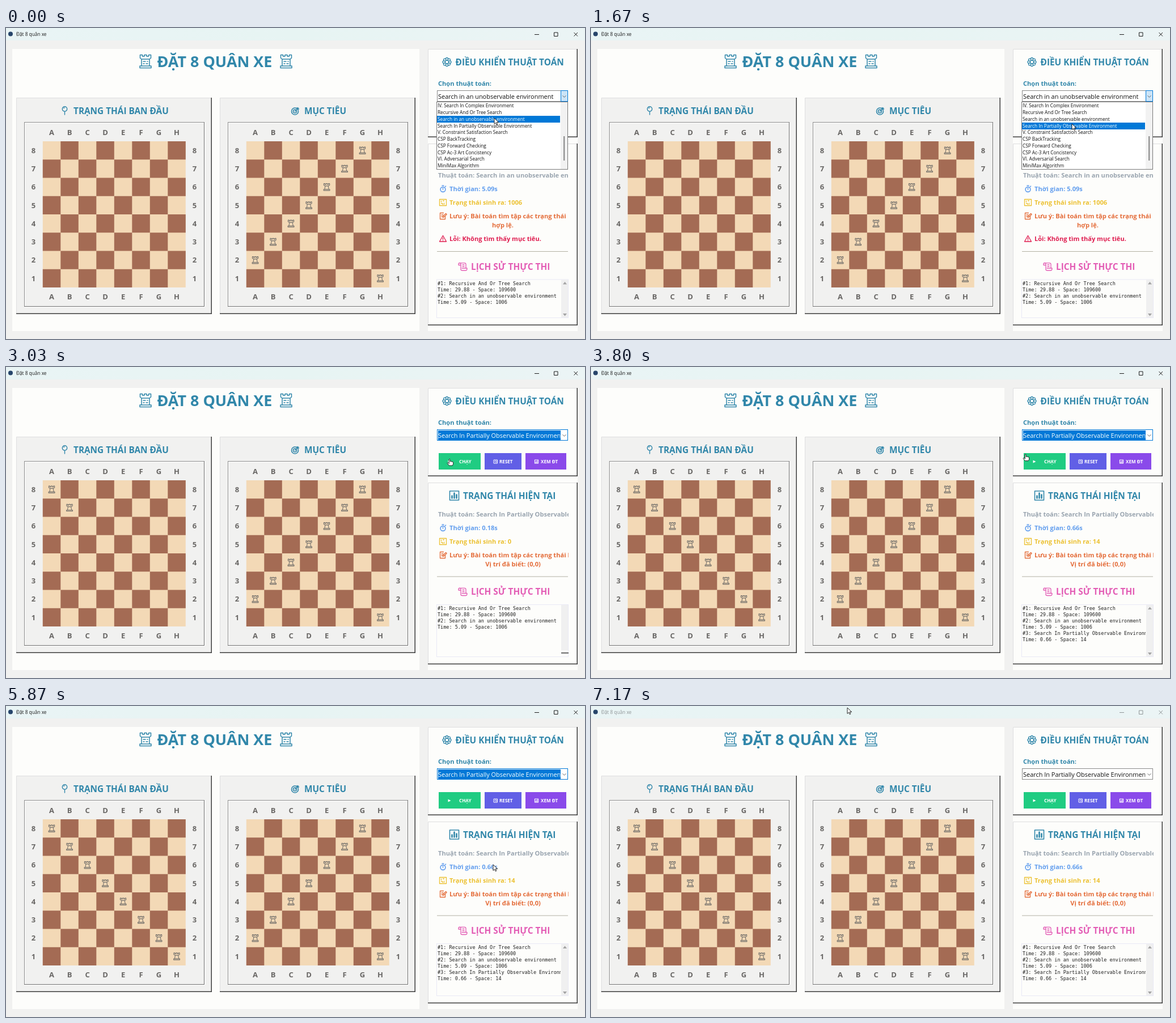
Recreate the animation shown at these times as an HTML page. Size 1021x549 px, loop 7.21 s.

```html
<!DOCTYPE html>
<html lang="vi">
<head>
<meta charset="utf-8">
<title>Đặt 8 quân xe</title>
<style>
  html, body { margin: 0; width: 100%; height: 100%; overflow: hidden; background: #f1f1f0; }
  svg { display: block; width: 1021px; height: 549px; }
  text { font-family: "Open Sans", "Noto Sans", sans-serif; white-space: pre; }
  .b { font-weight: 700; }
  .m { font-family: "DejaVu Sans Mono", monospace; }
  .i { fill: none; stroke: currentColor; stroke-width: 1.3; stroke-linejoin: round; stroke-linecap: round; }
</style>
</head>
<body>
<svg id="stage" viewBox="0 0 1021 549"></svg>
<script>
const LOOP = 7210, RUN = 2850, STEP = 80, CLOSE = 1980, BLUR = 6850;
const TEAL = '#3187aa', BLUE = '#0078d7', PAPER = '#fdfdfb', FACE = '#f1f1f0';
const BLUES = '#629eee', GOLD = '#ecc132', ORANGE = '#e46c39', RED = '#df1c4f', PINK = '#e35db5';
const BOARD_X = 64.8, CELL_W = 31.5, CELL_H = 32.25, GAP = 359;

const rect = (x, y, w, h, fill, extra = '') =>
  `<rect x="${x}" y="${y}" width="${w}" height="${h}" fill="${fill}" ${extra}/>`;
const box = (x, y, w, h, stroke, fill = 'none') =>
  rect(x + .5, y + .5, w - 1, h - 1, fill, `stroke="${stroke}"`);
const text = (x, y, size, fill, str, cls = '', extra = '') =>
  `<text x="${x}" y="${y}" font-size="${size}" fill="${fill}" class="${cls}" ${extra}>${str}</text>`;
const bold = (x, y, size, fill, str, extra) => text(x, y, size, fill, str, 'b', extra);
const middle = 'text-anchor="middle"';
const group = (id, body, extra = '') => `<g id="${id}" ${extra}>${body}</g>`;
const icon = (x, y, color, d, width = 1.3) =>
  `<path class="i" style="color:${color};stroke-width:${width}" transform="translate(${x} ${y})" d="${d}"/>`;
const range = n => [...Array(n).keys()];
const circle = (r, x = 0, y = 0) => `M${x - r} ${y}a${r} ${r} 0 1 0 ${2 * r} 0a${r} ${r} 0 1 0 ${-2 * r} 0`;

const ROOK = 'M-5.400 6v-2h1.800l.9-6-2.400-1.400v-2.800h2v1.500h1.800v-1.500h2.600v1.500h1.800v-1.500h2v2.800l-2.400 1.400 .9 6h1.800v2zM-2.700-2h5.400M-3.600 4h7.200';
const TOWER = 'M-10 11.500v-3.500h3v-12l-2.500-2v-5.500h4v2.500h3.500v-2.500h4v2.500h3.500v-2.500h4v5.500l-2.500 2v12h3v3.500zM-7-4h14M-7 8h14M-4 0h4M3 0h1M-4 4h2M1 4h3';
const CHEVRON = 'M-2.700-1.400l2.700 2.700 2.700-2.700';
const SCROLL = 'M-3 5v-9c0-3-4-3-4 0v1.500h4M-5-6.200h8.500c2 0 2.500 1 2.500 2.500v6.500M-1 3h9v1c0 2-1 3-2.500 3h-6c-2 0-2.500-1-2.500-2M0-3h3M0 0h3';

function raised(x, y, w, h, fill) {
  return rect(x, y, w, h, fill) +
    `<path d="M${x + .5} ${y + h}V${y + .5}H${x + w}" fill="none" stroke="#dededf"/>` +
    `<path d="M${x} ${y + h - .75}H${x + w - .75}V${y}" fill="none" stroke="#3c3c3c" stroke-width="1.5"/>`;
}

const rookAt = (left, col, row) =>
  icon(left + (col + .5) * CELL_W, 200.2 + (row + .5) * CELL_H, '#77736d', ROOK, 1.1);

function board(dx, title, titleX) {
  const left = BOARD_X + dx;
  let s = raised(18 + dx, 123, 345, 382, FACE) +
    bold(titleX, 151.5, 15.35, TEAL, title) +
    box(33 + dx, 167, 318, 326, '#ffffff') + box(32 + dx, 166, 318, 326, '#8d8d8d') +
    `<path d="M${32 + dx} 491.5H${349.5 + dx}V166" fill="none" stroke="#6f6f6f"/>` +
    rect(left, 200, 252, 258, '#f3d9b6');
  for (const i of range(8)) {
    const cx = left + (i + .5) * CELL_W, cy = 220.8 + i * CELL_H;
    for (const y of [188.7, 479]) s += bold(cx, y, 13, '#696765', 'ABCDEFGH'[i], middle);
    for (const x of [48.5, 332.5]) s += bold(x + dx, cy, 13, '#696765', 8 - i, middle);
    for (const c of range(8)) if ((i + c) % 2)
      s += rect(left + c * CELL_W, 200 + i * CELL_H, CELL_W, CELL_H, '#a46b54');
  }
  return s;
}

const titleBar =
  `<linearGradient id="bar"><stop stop-color="#e9f4f5"/><stop offset=".5" stop-color="#e7f4f3"/><stop offset="1" stop-color="#ebf4f5"/></linearGradient>` +
  rect(0, 0, 1021, 22, 'url(#bar)') +
  '<circle cx="8" cy="10.5" r="4" fill="#27456b"/>' +
  group('caption', text(18, 14, 8.3, 'currentColor', 'Đặt 8 quân xe') +
    '<path d="M932 11.5h8M966.5 8h6.500v6.500h-6.500zM1001.500 8l6.500 6.500M1008 8l-6.500 6.500" fill="none" stroke="currentColor"/>');

const heading = rect(11, 37, 718, 498, PAPER) +
  [246, 494].map(x => icon(x, 59, TEAL, TOWER, 1.5)).join('') +
  bold(266.5, 68.6, 26.9, TEAL, 'ĐẶT 8 QUÂN XE');

const boards = board(0, 'TRẠNG THÁI BAN ĐẦU', 119) +
  icon(103.5, 146, TEAL, circle(4.2, 0, -3) + 'M0 1.500V7M-1.500-4.500l1-.8', 1.4) +
  board(GAP, 'MỤC TIÊU', 526) +
  icon(509.5, 147, TEAL, circle(6) + circle(3) + 'M0 0l6-6M4-6.500v2.500h3', 1.6) +
  range(8).map(r => rookAt(BOARD_X + GAP, (14 - r) % 8, r)).join('') +
  range(8).map(r => group('rook' + r, rookAt(BOARD_X, r, r))).join('');

const petals = range(8).map(k => k * Math.PI / 4)
  .map(a => circle(2.2, +(5.3 * Math.cos(a)).toFixed(2), +(5.3 * Math.sin(a)).toFixed(2))).join('');

const button = (x, w, fill, label, labelX) =>
  rect(x, 152, w, 29, fill) + bold(labelX, 169.8, 8.1, '#fff', label);

const controls = raised(744, 37, 264, 156, PAPER) +
  icon(777.5, 60, TEAL, petals + circle(3)) +
  bold(792.5, 65.5, 15.4, TEAL, 'ĐIỀU KHIỂN THUẬT TOÁN') +
  bold(762, 101.6, 11.1, TEAL, 'Chọn thuật toán:') +
  button(763, 74, '#20cc82', 'CHẠY', 799) +
  '<path d="M779.500 164.500v5l5-2.500z" fill="#fff"/>' +
  button(844, 65, '#615fe6', 'RESET', 870) +
  icon(863.5, 167, '#fff', 'M-3-3h6v6h-6zM-1.500 0a1.500 1.500 0 1 1 1.500 1.500', 1) +
  button(916, 72, '#8a4aea', 'XEM ĐT', 943) +
  icon(935.5, 167, '#fff', 'M-3-3h6v6h-6zM-1 0v2M1-1.500v3.500', 1.2);

const combo = rect(760, 110, 231, 20, '#fff') + rect(762, 112, 216, 17, BLUE, 'id="selection"') +
  group('comboText', text(762, 125, 10.95, 'currentColor', '', '', 'id="choice"'), 'clip-path="url(#comboClip)"') +
  rect(760.5, 110.5, 230, 19, 'none', 'id="comboEdge"') +
  group('comboButton', box(978, 110, 13, 20, BLUE, '#cce4f7')) +
  icon(984.5, 121, '#555', CHEVRON, .9);

const status = raised(744, 204, 264, 321, PAPER) +
  icon(790.5, 227, TEAL, 'M-8-8h16v16h-16z', 1.6) +
  icon(790.5, 227, TEAL, 'M-4 4.500v-4M0 4.500v-9M4 4.500v-6', 2.6) +
  bold(806, 232.7, 15.4, TEAL, 'TRẠNG THÁI HIỆN TẠI') +
  group('lines',
    bold(762, 263.8, 11.1, '#9aa5b0', '', 'id="algo"') +
    bold(782, 287.8, 11.1, BLUES, '', 'id="time"') +
    bold(782, 311.8, 11.1, GOLD, '', 'id="count"') +
    bold(782, 335.8, 11.1, ORANGE, '', 'id="note"') +
    bold(894, 351.5, 11.1, ORANGE, '', `id="note2" ${middle}`), 'clip-path="url(#lineClip)"') +
  icon(770.5, 285, BLUES, circle(4.4) + 'M0-2.200V0M-1.500-6.800h3M4-4.800l1-1', 1.6) +
  icon(770.5, 308, GOLD, 'M-6-5.500h12v11h-12zM-3-3v2M0-3h2M-3 1.500h2M2 1v2.500M-1 3h1') +
  icon(770.5, 332, ORANGE, 'M1-5.500h-6v11h9v-5M-2.500-2h3M-2.500 1h2M0 2.500l.6-2.500 4.500-4.500 1.500 1.500-4.500 4.500z') +
  group('error', icon(770.5, 372, RED, 'M0-5.500l6 10.500h-12zM0-1.500v3M0 3.300v.1') +
    bold(782, 375.8, 11.05, RED, 'Lỗi: Không tìm thấy mục tiêu.'));

const record = (n, name, time, space, y) => group('rec' + n,
  text(761, y, 8.5, '#202020', `#${n}: ${name}`, 'm') +
  text(761, y + 11, 8.5, '#202020', `Time: ${time} - Space: ${space}`, 'm'));

const history = group('history',
  rect(760, 369.5, 231, 1, '#b3b1a3') +
  icon(805, 396.5, PINK, SCROLL) + bold(820, 402, 15.4, PINK, 'LỊCH SỬ THỰC THI') +
  group('records',
    record(1, 'Recursive And Or Tree Search', '29.88', 109600, 429) +
    record(2, 'Search in an unobservable environment', '5.09', 1006, 451) +
    record(3, 'Search In Partially Observable Environment', '0.66', 14, 473),
    'clip-path="url(#recordClip)"')) +
  rect(759.5, 419.5, 232, 92, 'none', 'id="historyBox" stroke="#e9e9f5"') +
  rect(979, 420, 12, 91, '#f0f0f0', 'id="track"') +
  group('arrows',
    '<path id="arrowUp" d="M982 428l3.500-4.500 3.500 4.500z" fill="#a3a3a3"/><path d="M982 504l3.500 4.500 3.500-4.500z" fill="#a3a3a3"/>') +
  group('trackEnd', rect(979, 504, 13, 1.5, '#3c3c3c'));

const OPTIONS = ['IV. Search In Complex Environment', 'Recursive And Or Tree Search',
  'Search in an unobservable environment', 'Search In Partially Observable Environment',
  'V. Constraint Satisfaction Search', 'CSP BackTracking', 'CSP Forward Checking',
  'CSP Ac-3 Art Concistency', 'VI. Adversarial Search', 'MiniMax Algorithm'];

const dropdown = group('dropdown', box(759, 130, 232, 120, '#7a7a7a', '#fff') +
  rect(978, 131, 12, 118, '#f2f2f2') + rect(983.2, 191, 2, 43, '#858585') +
  rect(760, 155, 217, 12, BLUE, 'id="hover"') +
  OPTIONS.map((o, i) => text(761, 140.4 + i * 11.76, 8.28, '#111', o, '', `id="opt${i}"`)).join(''));

const cursor =
  group('arrow', '<path d="M0 0v10.500l2.500-2.300 1.700 3.600 1.700-.8-1.700-3.500h3.500z" fill="#fff" stroke="#111" stroke-width=".9"/>') +
  group('hand', '<path d="M-1.500 6l-3-3.500c-1-1.300.5-2.200 1.500-1.200l1.200 1.200v-7c0-1.500 2-1.500 2 0v3.500c.4-.8 1.800-.7 1.900.2.5-.7 1.800-.5 1.800.4.6-.6 1.700-.2 1.700.8v3.200l-1.400 2.400z" fill="#fff" stroke="#111" stroke-width=".9"/>');

const clip = (id, x, y, w, h) => `<clipPath id="${id}">${rect(x, y, w, h, '#000')}</clipPath>`;
document.getElementById('stage').innerHTML =
  clip('comboClip', 761, 111, 216.5, 18) + clip('lineClip', 760, 250, 232, 106) + clip('recordClip', 760, 380, 218, 132) +
  rect(0, 0, 1021, 549, FACE) + titleBar + heading + boards +
  rect(744, 37, 264, 498, PAPER) + controls + status + history + combo + dropdown + cursor;

const $ = id => document.getElementById(id);
const show = (id, on) => { $(id).style.display = on ? '' : 'none'; };
const set = (id, name, value) => $(id).setAttribute(name, value);
const write = (id, str) => { if ($(id).textContent !== str) $(id).textContent = str; };

// time, x, y
const PATH = [
  [0, 861, 159], [200, 861, 159], [620, 850, 170], [1200, 848, 169], [2050, 848, 169],
  [2600, 783, 168], [3720, 783, 168], [4320, 462, -1], [4800, 462, -1],
  [5600, 859, 280], [6000, 859, 280], [6600, 452, 3], [LOOP, 452, 3]];

function pointer(t) {
  const k = PATH.findIndex((p, i) => t < PATH[i + 1][0]);
  const [t0, x0, y0] = PATH[k], [t1, x1, y1] = PATH[k + 1];
  const u = (t - t0) / (t1 - t0), e = u * u * (3 - 2 * u);
  return [x0 + (x1 - x0) * e, y0 + (y1 - y0) * e];
}

function render(t) {
  const [x, y] = pointer(t);
  const open = t < CLOSE, started = t >= RUN, active = t < BLUR;
  const placed = started ? Math.min(8, Math.floor((t - RUN) / STEP)) : 0;
  const done = t >= RUN + 9 * STEP, running = started && !done;

  const onButton = !open && x > 763 && x < 837 && y > 152 && y < 181;
  show('arrow', !onButton);
  show('hand', onButton);
  for (const id of ['arrow', 'hand']) set(id, 'transform', `translate(${x} ${y})`);

  const row = y > 166 ? 3 : 2;
  show('dropdown', open);
  set('hover', 'y', 155 + (row - 2) * 12);
  for (const i of [2, 3]) set('opt' + i, 'fill', i === row ? '#fff' : '#111');

  const selected = !open && active;
  write('choice', OPTIONS[open ? 2 : 3]);
  show('selection', selected);
  show('comboButton', open);
  set('comboText', 'color', selected ? '#fff' : '#111');
  set('comboEdge', 'stroke', selected ? BLUE : '#8a8a8a');
  set('caption', 'color', active ? '#1c1c1c' : '#8f9597');

  for (const i of range(8)) show('rook' + i, i < placed);
  write('algo', 'Thuật toán: ' + OPTIONS[started ? 3 : 2]);
  write('time', `Thời gian: ${started ? (.02 + .08 * placed).toFixed(2) : '5.09'}s`);
  write('count', 'Trạng thái sinh ra: ' + (started ? (done ? 14 : 0) : 1006));
  write('note', 'Lưu ý: Bài toán tìm tập các trạng thái' + (started ? ' hợp lệ.' : ''));
  write('note2', started ? 'Vị trí đã biết: (0,0)' : 'hợp lệ.');
  set('note2', 'x', started ? 894 : 876);
  show('error', !started);

  // The error line pushes the history section down.
  const shift = started ? 0 : 24.5;
  for (const id of ['history', 'arrowUp']) set(id, 'transform', `translate(0 ${shift})`);
  set('historyBox', 'y', 419.5 + shift);
  set('historyBox', 'height', 92 - shift);
  set('track', 'y', 420 + shift);
  set('track', 'height', (running ? 80 : 91) - shift);
  show('arrows', !running);
  show('trackEnd', running);
  show('rec3', done);
}

function tick() {
  render(performance.now() % LOOP);
  requestAnimationFrame(tick);
}
tick();
</script>
</body>
</html>
```
